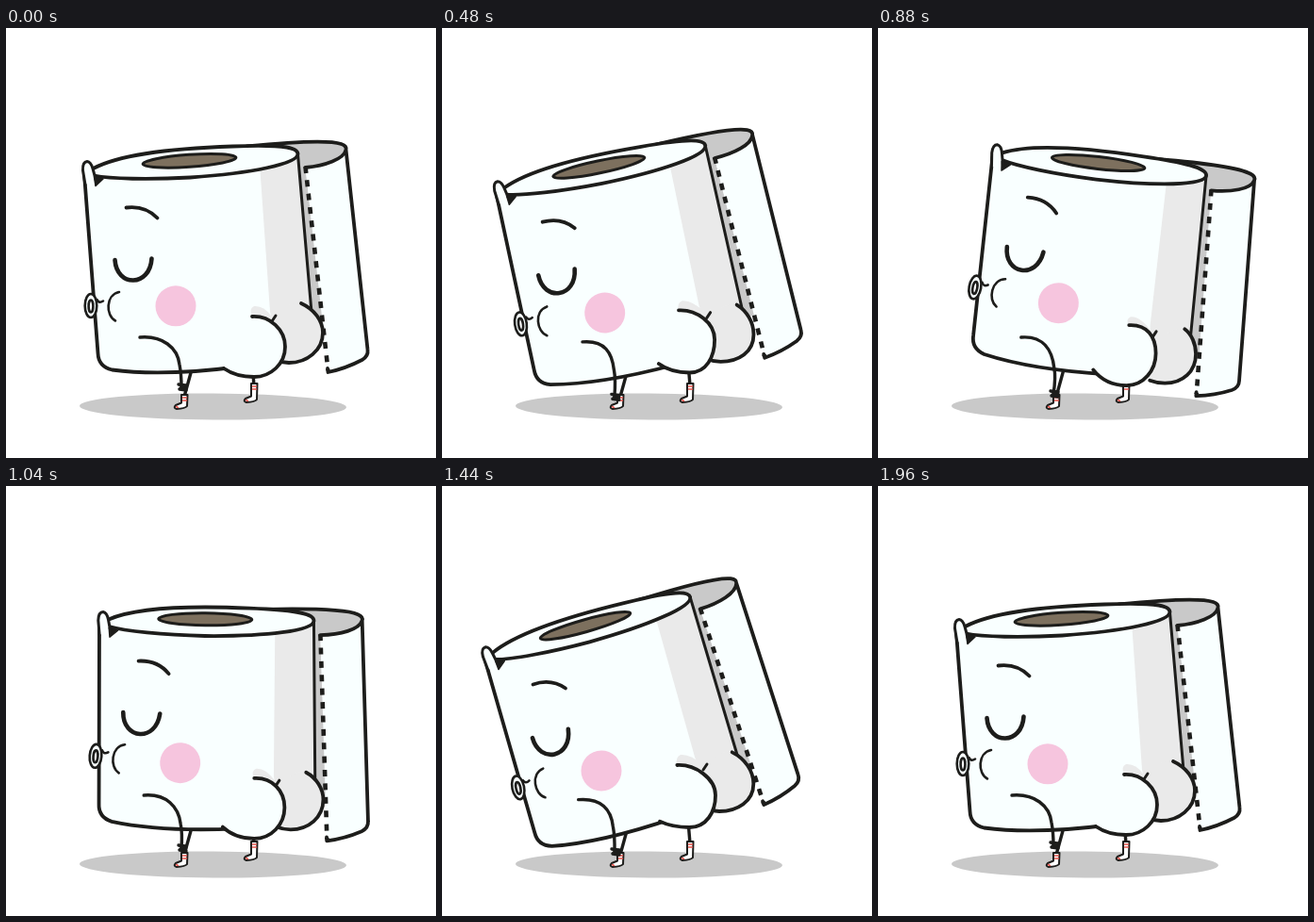
These frames come from a looping animation (456x456 px, 2000 ms). An HTML page:

```html
<!DOCTYPE html>
<html lang="en">
<head>
<meta charset="utf-8">
<title>Paper roll</title>
<style>
  html, body { margin: 0; width: 100%; height: 100%; overflow: hidden; background: #fff; }
  svg { display: block; width: 100%; height: 100%; }
  .ink { fill: none; stroke: #1d1d1b; stroke-width: 3.8; stroke-linecap: round; stroke-linejoin: round; }
  .paper { fill: #f9ffff; }
  .shade { fill: #eaeaea; }
  .dark { fill: #c9c9c9; }
</style>
</head>
<body>
<svg viewBox="0 0 456 456">
  <ellipse class="dark" cx="219.5" cy="401.5" rx="141.5" ry="14" transform="rotate(.3 219.5 401.5)"/>
  <g id="feet" class="ink"></g>

  <g id="body">
    <!-- loose sheet -->
    <path class="dark" d="M255 125C290 121 340 117 355 122Q361 124 360 128C358 138 338 145 317 147L337 318L325 318L309 133Z"/>
    <path class="paper" d="M317 147C338 145 358 138 360 128L383 340Q384 347 377 351Q360 360 341 364Z"/>
    <path class="ink" d="M255 124.500C290 121 340 117 355 122Q361 124 360 128C358 138 338 145 317 147M360 128L383 340Q384 347 377 351Q360 360 341 364L340.500 360"/>
    <path class="ink" d="M317 146L341 362" style="stroke-width:4.600;stroke-linecap:butt;stroke-dasharray:7 7.400"/>
    <!-- roll -->
    <path class="paper" d="M82.500 150L97 346Q97.500 358 112 361.500Q165 368.500 232 360L290 350L325 318L309 133L200 128L92 150Z"/>
    <path class="shade" d="M269 150L279.500 300L290 345L325 318L309 133Z"/>
    <path class="ink" d="M309 133L325 318" style="stroke-width:3"/>
    <path class="ink" style="fill:#f9ffff" d="M92 148C120 133 180 126.500 240 124.500C290 122.500 308.500 125 309 132.500C309 143 260 153 195 157.500C150 160 110 159 93 155.500"/>
    <ellipse class="ink" style="fill:#7d705e;stroke-width:3" cx="194" cy="139.800" rx="49.500" ry="6.500" transform="rotate(-4 194 139.800)"/>
    <path class="ink" d="M82.500 154L97 344Q97.500 358 112 361.500Q165 368.500 245 358.500"/>
    <path class="ink" style="fill:#f9ffff;stroke-width:3" d="M83.500 165L81 150Q80.500 141 85.500 140.500Q89.500 141 91.500 148L95 161"/>
    <path class="ink" style="fill:#1d1d1b;stroke-width:1.500" d="M93 157L102.500 159L94.500 166.500Z"/>
    <!-- face -->
    <path class="ink" d="M127 189.500Q147 187 160 200.500"/>
    <path class="ink" style="stroke-width:4.600" d="M115 245C117 274 152 274 154 243.500"/>
    <path class="ink" style="stroke-width:2.600" d="M119.500 279C105 282 105 304 115.500 309.500M96 287Q98 291.500 102.500 288.500"/>
    <ellipse class="ink" style="fill:#f9ffff;stroke-width:2.600" cx="89.500" cy="293.500" rx="6.300" ry="12.500"/>
    <ellipse class="ink" style="fill:#fff;stroke-width:2.600" cx="89.500" cy="294" rx="2.400" ry="6.500"/>
    <circle cx="179.500" cy="293.800" r="21.500" fill="#f6c5de"/>
  </g>

  <path id="rightFill" class="shade"/>
  <path id="rightLine" class="ink"/>
  <path id="crease" class="shade"/>
  <path id="leftFill" class="paper"/>
  <path id="leftLine" class="ink"/>
  <path id="tick" class="ink" style="stroke-width:3"/>
  <path id="arm" class="ink" style="stroke-width:3.400"/>
  <path id="hand" class="ink" style="stroke-width:3.400"/>
</svg>
<script>
const $ = id => document.getElementById(id);
const draw = (id, d) => $(id).setAttribute('d', d);

// Each pose lists knots as x, y pairs; everything is blended linearly.
const rest = {
  angle: [0], center: [210.5, 246],
  left: [261, 306, 296, 338, 263, 370, 231, 361],
  right: [313, 292, 336, 323, 300, 355],
  crease: [258, 295], tick: [286, 305],
  arm: [142, 328, 184, 357, 187, 381]
};
const back = {
  angle: [-17.5], center: [178.2, 249],
  left: [243.5, 291, 287, 323, 262, 358, 231, 353],
  right: [305, 277.5, 327.5, 312, 291, 340],
  crease: [243, 280], tick: [278.5, 290],
  arm: [146, 335, 180, 363, 182.5, 391.5]
};
const front = {
  angle: [15], center: [238.7, 250.7],
  left: [268.5, 319, 294, 348, 264, 383, 227, 363],
  right: [330.5, 331, 337.5, 355, 306, 386],
  crease: [265, 311], tick: [299, 329],
  arm: [156, 328, 188, 362, 187, 391]
};
const keys = [
  [0, rest], [360, back], [760, front], [1160, rest], [1200, rest],
  [1560, back], [1600, back], [1960, rest], [2000, rest]
];

function poseAt(t) {
  const i = keys.findIndex(key => key[0] > t);
  const [t0, a] = keys[i - 1], [t1, b] = keys[i];
  const k = (t - t0) / (t1 - t0), pose = {};
  for (const part in a) pose[part] = a[part].map((v, n) => v + (b[part][n] - v) * k);
  return pose;
}

function foot(x, y, h, legX, legY) {
  return `<path d="M${legX} ${legY}L${x + 1} ${y - h + 2}" stroke-width="3.400"/>
    <g transform="translate(${x} ${y})" style="stroke-width:2">
    <path fill="#fff" d="M-2 ${-h}L4.500 ${-h}L4 -3Q2 -.5 -7 0Q-11 -1 -8 -4L-2 -6.500Z"/>
    <path style="stroke:#e5534b;stroke-width:1.500" d="M-.5 ${3 - h}h4M-.5 ${6 - h}h4M-7.500 -2.500l2 1"/></g>`;
}
$('feet').innerHTML = foot(262, 397, 20, 261, 355) + foot(188, 404, 15, 197, 362);

function render(t) {
  const p = poseAt(t);
  $('body').setAttribute('transform', `translate(${p.center}) rotate(${p.angle}) translate(-210 -245)`);

  const [lx, ly, lrx, lry, lbx, lby, lex, ley] = p.left;
  const left = `M${lx} ${ly}C${lx + 19} ${ly - 1} ${lrx} ${lry - 18} ${lrx} ${lry}
    C${lrx} ${lry + 18} ${lbx + 18} ${lby} ${lbx} ${lby}Q${lex + 13} ${lby} ${lex} ${ley}`;
  draw('leftFill', left + 'Z');
  draw('leftLine', left);

  const [rx, ry, rrx, rry, rbx, rby] = p.right;
  const dx = rrx - rx, dy = rry - ry;
  const right = `M${rx} ${ry}C${rx + dx * .6} ${ry + dy * .2} ${rrx} ${rry - dy * .4} ${rrx} ${rry}
    C${rrx} ${rry + 19} ${rbx + 19} ${rby} ${rbx} ${rby}Q${rbx - 8} ${rby} ${rbx - 16} ${rby - 3}`;
  draw('rightFill', right + `L${rbx - 20} ${ry + 25}Q${rx - 15} ${ry - 4} ${rx} ${ry}Z`);
  draw('rightLine', right);

  const [cx, cy] = p.crease, [tx, ty] = p.tick;
  draw('crease', `M${lx} ${ly}Q${cx - 1} ${cy + 3} ${cx + 5} ${cy}Q${cx + 15} ${cy - 1} ${tx - 5} ${ty}L${tx - 4} ${ty + 7}Z`);
  draw('tick', `M${tx} ${ty}L${tx - 4} ${ty + 6}`);

  const [ax, ay, ex, ey, hx, hy] = p.arm;
  draw('arm', `M${ax} ${ay}C${ax + 24} ${ay - 2} ${ex - 2} ${ey - 18} ${ex} ${ey}Q${ex + 2} ${ey + 10} ${hx - 1} ${hy}`);
  draw('hand', `M${hx - 4} ${hy - 3}l7 1l-6 4l7 1M${hx + 4} ${hy - 2}l-1 5`);
}

const start = performance.now();
function tick(now) {
  render(Math.floor(Math.max(0, now - start) % 2000 / 40) * 40);
  requestAnimationFrame(tick);
}
render(0);
requestAnimationFrame(tick);
</script>
</body>
</html>
```
